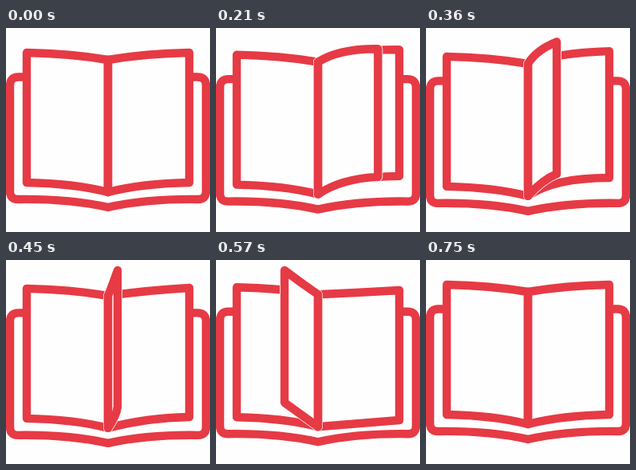
An HTML page with a canvas that plays this animation: 256 by 256 pixels, repeating every 0.84 s.

```html
<!DOCTYPE html>
<html lang="en">
<head>
<meta charset="utf-8">
<title>Turning page</title>
<style>
  html, body { margin: 0; width: 100%; height: 100%; overflow: hidden; background: #fefefe; }
  canvas { display: block; width: 100vw; height: 100vh; }
</style>
</head>
<body>
<canvas id="stage" width="256" height="256"></canvas>
<script>
const ctx = document.getElementById('stage').getContext('2d');
const RED = '#e63a45', PAPER = '#fefefe';
const LOOP = 840, STEP = 30, START = 60, END = 750;
const SPINE = 128, LINE = 10.4;

// time, edge x, edge top, edge bottom, top control x/y, bottom control x/y
const turningKeys = [
  [START, 230, 31, 194, 175, 32, 171, 195],
  [150, 220, 29, 191, 168, 29, 165, 192],
  [270, 184, 23, 183, 143, 23, 149, 187],
  [450, 140, 13, 184, 133, 33, 139, 195],
  [570, 86, 13, 179, 107, 29, 107, 194],
  [630, 60, 17, 182, 94, 30, 94, 194],
  [END, 26, 31, 194, 81, 32, 85, 195]
];
const restingKeys = [
  [START, 230, 31, 194, 175, 32, 171, 195],
  [150, 230, 30, 191, 172, 29, 168, 192],
  [270, 230, 25, 182, 150, 26, 150, 182],
  [450, 230, 35, 197, 178, 38, 175, 198],
  [570, 230, 38, 201, 179, 41, 179, 205],
  [630, 230, 35, 199, 179, 38, 179, 202],
  [END, 230, 31, 194, 175, 32, 171, 195]
];

// Smooth curve through the keys, at rest on both ends
function sample(keys, time) {
  const t = Math.min(Math.max(time, START), END);
  let i = 0;
  while (i < keys.length - 2 && t >= keys[i + 1][0]) i++;
  const a = keys[i], b = keys[i + 1], span = b[0] - a[0];
  const u = (t - a[0]) / span, u2 = u * u, u3 = u2 * u;
  const slope = (k, c) => {
    const p = keys[k - 1], q = keys[k], n = keys[k + 1];
    if (!p || !n) return 0;
    const before = q[0] - p[0], after = n[0] - q[0];
    return ((q[c] - p[c]) / before * after + (n[c] - q[c]) / after * before) / (before + after);
  };
  return a.slice(1).map((v, j) => {
    const c = j + 1;
    return v * (2 * u3 - 3 * u2 + 1) + b[c] * (3 * u2 - 2 * u3)
      + span * (slope(i, c) * (u3 - 2 * u2 + u) + slope(i + 1, c) * (u3 - u2));
  });
}

function stroke(color = RED, width = LINE) {
  ctx.strokeStyle = color;
  ctx.lineWidth = width;
  ctx.stroke();
}

function drawPage([x, top, bottom, tx, ty, bx, by], drop, halo) {
  ctx.beginPath();
  ctx.moveTo(SPINE, 40 + drop);
  ctx.quadraticCurveTo(tx, ty, x, top);
  ctx.lineTo(x, bottom);
  ctx.quadraticCurveTo(bx, by, SPINE, 206 + drop);
  ctx.closePath();
  ctx.fillStyle = PAPER;
  ctx.fill();
  if (halo) stroke(PAPER, LINE + 1.6);
  stroke();
}

function drawCover(drop) {
  ctx.beginPath();
  for (const side of [-1, 1]) {
    const x = d => SPINE + side * d;
    ctx.moveTo(x(102), 61.5 + drop);
    ctx.lineTo(x(112), 61.5 + drop);
    ctx.quadraticCurveTo(x(123), 61.5 + drop, x(123), 72 + drop);
    ctx.lineTo(x(123), 205 + drop);
    ctx.quadraticCurveTo(x(123), 215 + drop, x(113), 215 + drop);
    ctx.quadraticCurveTo(x(50), 214 + drop, SPINE, 225 + drop);
  }
  stroke();
}

function draw(time) {
  const t = Math.floor(time / STEP) * STEP;
  const moving = t >= 90 && t < END;
  const phase = moving ? (t - START) / (END - START) : 0;
  const drop = 5 * Math.pow(Math.sin(Math.PI * phase), 1.4);

  ctx.fillStyle = PAPER;
  ctx.fillRect(0, 0, 256, 256);
  ctx.lineJoin = ctx.lineCap = 'round';

  drawCover(drop);
  drawPage([26, 31 + drop, 194 + drop, 81, 32 + drop, 85, 195 + drop], drop);
  drawPage(sample(restingKeys, moving ? t : START), drop);
  if (moving) drawPage(sample(turningKeys, t), drop, true);

  ctx.beginPath();
  ctx.moveTo(SPINE, 40 + drop);
  ctx.lineTo(SPINE, 206 + drop);
  stroke();
}

const origin = performance.now();
function tick() {
  draw((performance.now() - origin) % LOOP);
  requestAnimationFrame(tick);
}
tick();
</script>
</body>
</html>
```
